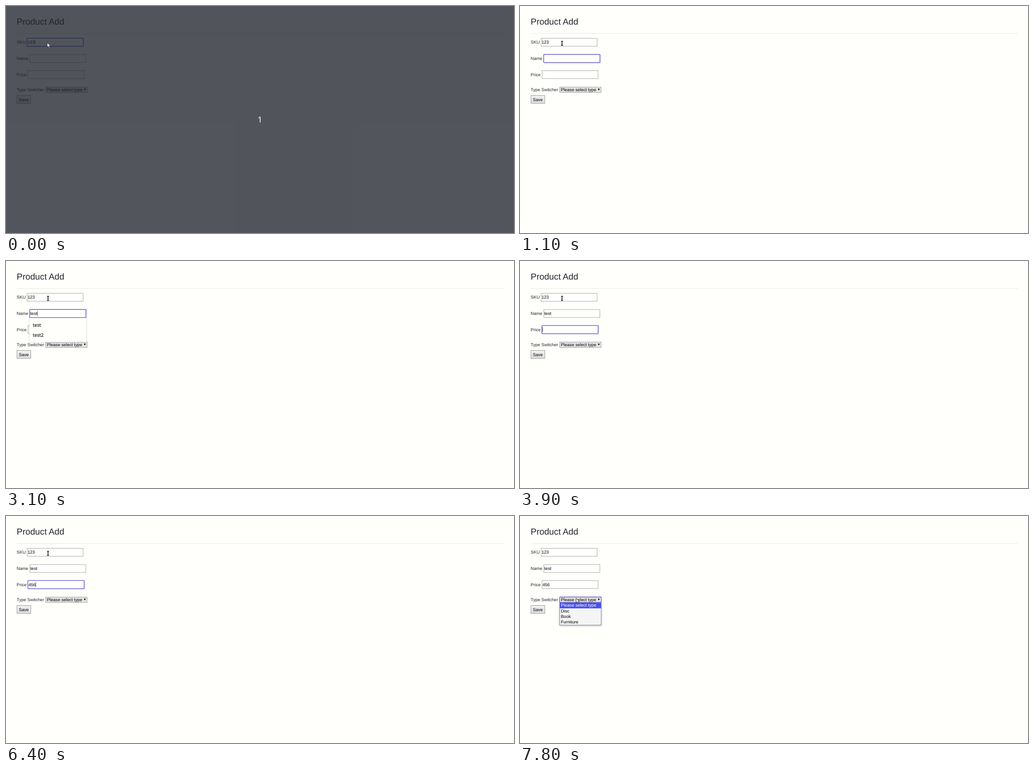
Animation of 1118x501 px, one loop 8000 ms. Source, as an HTML page:

```html
<!DOCTYPE html>
<html lang="en">
<head>
<meta charset="utf-8">
<title>Product Add</title>
<style>
  html, body { margin: 0; width: 100%; height: 100%; overflow: hidden; background: #fffffc; }
  svg { display: block; width: 1118px; height: 501px; }
  text { font: 9.6px "Liberation Sans", Arial, sans-serif; fill: #212529; text-rendering: geometricPrecision; white-space: pre; }
  .title { font-size: 19.2px; }
  .control { fill: #000; }
  .box { fill: #fffffe; stroke: #a3a3a3; }
  .ring { fill: none; stroke: #5a50d2; stroke-width: 1.25; }
  .caret { fill: #333; }
  .button { stroke: #979797; }
  .suggestion { font: 10.2px "Noto Sans", "Open Sans", sans-serif; fill: #222; stroke: #222; stroke-width: .25; }
  .popup { filter: drop-shadow(0 .5px 1px rgba(0, 0, 0, .35)); }
  .list { filter: drop-shadow(0 1.5px 2px rgba(0, 0, 0, .3)); }
  .count { font: 18px "Noto Sans", "Open Sans", sans-serif; fill: #fff; text-anchor: middle; }
</style>
</head>
<body>
<svg viewBox="0 0 1118 501">
  <defs>
    <linearGradient id="face" x2="0" y2="1">
      <stop stop-color="#f3f3f3"/><stop offset="1" stop-color="#dcdcdc"/>
    </linearGradient>
  </defs>
  <rect width="1118" height="501" fill="#fffffc"/>
  <text class="title" x="23.6" y="41.3">Product Add</text>
  <path d="M24 60.5H1095" stroke="#e6e6e3"/>
  <text x="23.6" y="83">SKU</text>
  <text x="23.6" y="118.8">Name</text>
  <text x="23.6" y="154.6">Price</text>
  <text x="23.6" y="188.3">Type Switcher</text>

  <g id="fields"></g>

  <rect class="button" x="87.5" y="179" width="91" height="11.8" fill="#e6e6e6"/>
  <text class="control" x="89.9" y="188.3">Please select type</text>
  <path d="M171.2 182.4h4.4l-2.2 4z"/>
  <rect class="button" x="24" y="197.5" width="30.6" height="17.5" fill="url(#face)"/>
  <text class="control" x="28.3" y="209.5">Save</text>
  <rect class="ring" data-on="7700-8000" x="87.2" y="178.7" width="91.6" height="12.4" rx="1"/>

  <g id="popup" class="popup">
    <rect id="sheet" x="51.8" y="125.5" width="125" fill="#fffffc"/>
    <text class="suggestion" x="59" y="145">test</text>
    <text class="suggestion" x="59" y="166.6">test2</text>
    <text class="suggestion" data-on="2600-2700" x="59" y="188.2">tt</text>
  </g>

  <g class="list" data-on="7800-8000">
    <rect x="87.4" y="191.4" width="91.3" height="49.4" fill="#f5f5f5" stroke="#77779b" stroke-width=".9"/>
    <rect x="87.6" y="191.2" width="90.9" height="12.6" fill="#4950ee"/>
    <text x="89.9" y="200.3" style="fill:#fff">Please select type</text>
    <text class="control" x="89.9" y="212.5">Disc</text>
    <text class="control" x="89.9" y="224.7">Book</text>
    <text class="control" x="89.9" y="237.1">Furniture</text>
  </g>

  <g data-on="0-400">
    <rect width="1118" height="501" fill="rgba(33, 37, 46, .78)"/>
    <text class="count" x="559" y="257.3">1</text>
  </g>

  <path id="beam" d="M-2-4.5H2M-2 4.5H2M0-4.5V4.5" fill="none" stroke="#222" stroke-width="1.8"/>
  <path id="arrow" d="M0 0V10.2L2.3 8.1L3.9 11.7L5.6 11L4 7.5H7.1Z" fill="#fff" stroke="#111" stroke-width=".8"/>
</svg>
<script>
const LOOP = 8000;
const $ = id => document.getElementById(id);

// typed: [time, text]; caret and focus: time ranges
const fields = [
  { x: 46, y: 71, typed: [[0, '123']], caret: '0-500', focus: '0-500' },
  { x: 52, y: 106.8, typed: [[0, ''], [2500, 't'], [2700, 'te'], [2800, 'tes'], [3100, 'test']],
    caret: '500-1100 1700-2300 2500-3600', focus: '500-3600' },
  { x: 48, y: 142.3, typed: [[0, ''], [5900, '4'], [6200, '45'], [6400, '456']],
    caret: '3600-4200 4800-5400 5900-7000 7600-7700', focus: '3600-7700' }
];

// [time, shape, x, y]
const pointer = [
  [0, 'arrow', 90.8, 80.8], [400, 'beam', 92.5, 82.3], [7000, 'beam', 93.5, 82.3],
  [7300, 'beam', 96, 86], [7400, 'arrow', 104, 98], [7500, 'beam', 114, 122],
  [7600, 'arrow', 121.5, 168], [7700, 'arrow', 123.4, 181.4]
];

$('fields').innerHTML = fields.map(({ x, y, caret, focus }) => `
  <rect class="box" x="${x + .5}" y="${y + .3}" width="123.3" height="17.6"/>
  <rect class="ring" data-on="${focus}" x="${x + .1}" y="${y}" width="124.1" height="18.2" rx="1"/>
  <text class="control value" x="${x + 1.4}" y="${y + 12.2}"></text>
  <rect class="caret" data-on="${caret}" y="${y + 3.6}" width=".8" height="10.8"/>`).join('');

const values = [...document.querySelectorAll('.value')];
const timed = [...document.querySelectorAll('[data-on]')].map(node => ({
  node, spans: node.dataset.on.split(' ').map(span => span.split('-').map(Number))
}));

const latest = (steps, t) => steps.findLast(step => step[0] <= t);
const show = (node, on) => { node.style.display = on ? '' : 'none'; };

function draw(t) {
  timed.forEach(({ node, spans }) => show(node, spans.some(([from, to]) => t >= from && t < to)));

  values.forEach((value, i) => {
    const text = latest(fields[i].typed, t)[1];
    value.textContent = text;
    const width = text ? value.getComputedTextLength() : 0;
    value.nextElementSibling.setAttribute('x', fields[i].x + 1.3 + width);
  });

  const fade = t < 3600 ? 1 : 1 - (Math.floor((t - 3600) / 100) + 1) / 4;
  show($('popup'), t >= 2600 && fade > 0);
  $('popup').style.opacity = Math.max(0, fade);
  $('sheet').setAttribute('height', t < 2700 ? 75 : 53.4);

  const [, shape, x, y] = latest(pointer, t);
  for (const id of ['beam', 'arrow']) show($(id), id === shape);
  $(shape).setAttribute('transform', `translate(${x} ${y})`);
}

const start = performance.now();
function tick() {
  draw((performance.now() - start) % LOOP);
  requestAnimationFrame(tick);
}
tick();
</script>
</body>
</html>
```
